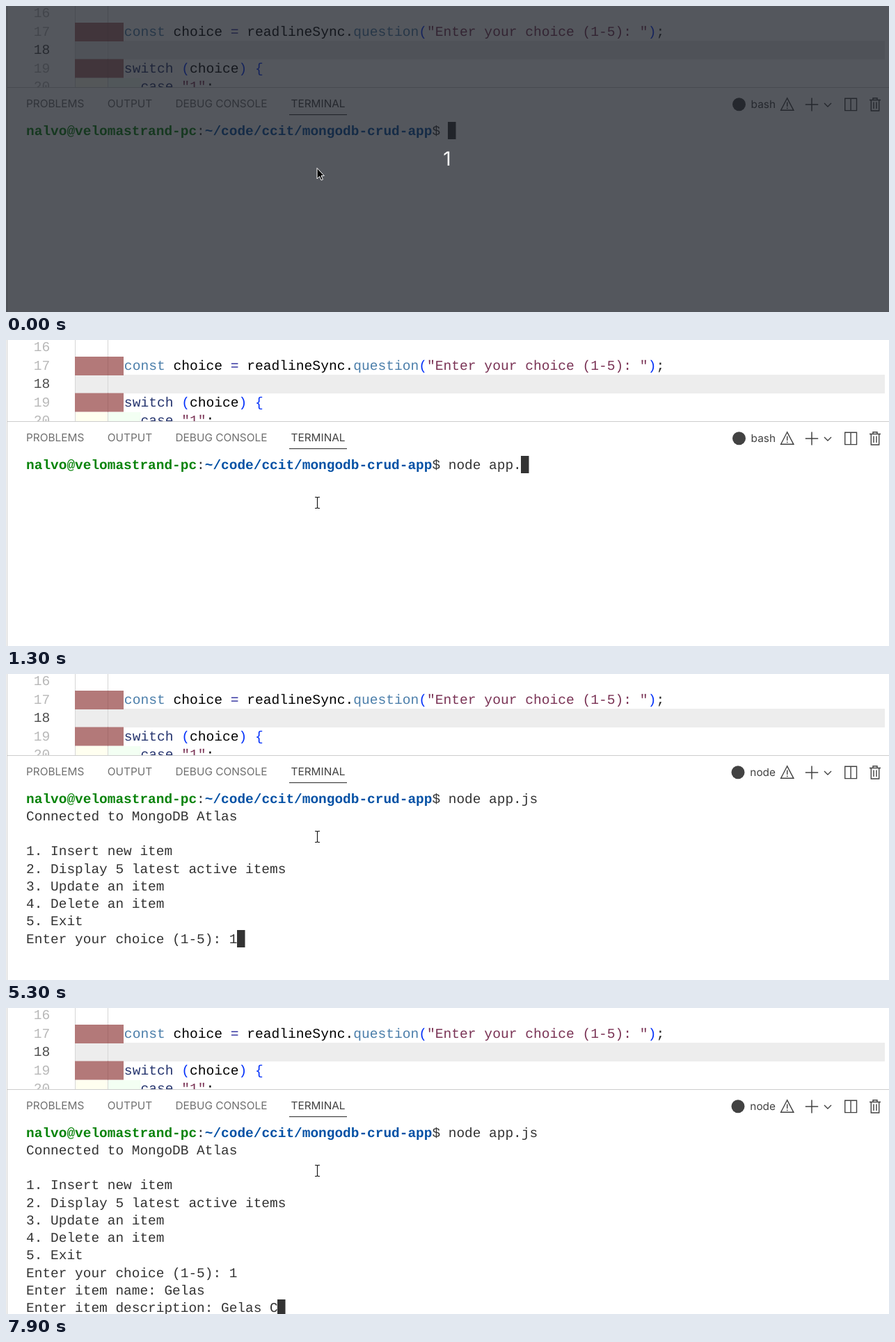
These frames come from a looping animation (1269x441 px, 8000 ms). An HTML page with a canvas:

```html
<!DOCTYPE html>
<html lang="en">
<head>
<meta charset="utf-8">
<title>Terminal session</title>
<style>
  html, body { margin: 0; width: 100%; height: 100%; overflow: hidden; background: #fff; }
  canvas { display: block; }
</style>
</head>
<body>
<canvas id="stage" width="1269" height="441"></canvas>
<script>
const W = 1269, H = 441, LOOP = 8000;
const ctx = document.getElementById('stage').getContext('2d');
ctx.textRendering = 'geometricPrecision';

const MONO = '"Liberation Mono", monospace';
const UI = '15.4px Inter, sans-serif';
const CODE = { x: 99.3, top: -2.2, row: 26.5, base: 18.6, size: 19.6, cell: 11.762, first: 16 };
const TERM = { x: 29.1, top: 167, row: 25.25, base: 18.7, size: 19.44, cell: 11.667 };
const INK = '#333333', ICON = '#424242';
const KEYWORD = '#26356f', STRING = '#7a3355', BRACKET = '#0431fa', FUNC = '#4b7eaa';

const MENU = [
  'Connected to MongoDB Atlas',
  '',
  '1. Insert new item',
  '2. Display 5 latest active items',
  '3. Update an item',
  '4. Delete an item',
  '5. Exit'
];

function rect(x, y, w, h, color) {
  ctx.fillStyle = color;
  ctx.fillRect(x, y, w, h);
}

function text(str, x, y, font, color, align = 'left') {
  ctx.font = font;
  ctx.fillStyle = color;
  ctx.textAlign = align;
  ctx.fillText(str, x, y);
}

function stroke(d, color = ICON, width = 1.4) {
  ctx.strokeStyle = color;
  ctx.lineWidth = width;
  ctx.stroke(new Path2D(d));
}

// Draws [text, color] parts on a character grid
function spans(grid, col, line, parts, weight = '') {
  const y = grid.top + line * grid.row + grid.base;
  for (const [str, color] of parts) {
    text(str, grid.x + col * grid.cell, y, `${weight} ${grid.size}px ${MONO}`, color);
    col += str.length;
  }
}

function editor() {
  ctx.save();
  ctx.beginPath();
  ctx.rect(0, 0, W, 117);
  ctx.clip();
  rect(99, 50, 1164, 27, '#ededed');
  rect(99, 104, 47, 13, '#fffff0');
  rect(146, 104, 47.5, 13, '#f3fff3');
  rect(99, 0, 1, 117, '#d6d6d6');
  rect(146, 0, 1, 117, '#d6d6d6');
  for (const y of [24, 76.5]) {
    rect(99, y, 70, 27, '#b37979');
    rect(146, y, 1, 27, '#a56c6c');
  }
  for (let i = 0; i < 5; i++) {
    const color = i === 2 ? '#4d4d4d' : '#b8b8b8';
    spans(CODE, -5.06, i, [[String(CODE.first + i), color]]);
  }
  spans(CODE, 6, 1, [
    ['const ', FUNC], ['choice ', '#000'], ['= ', '#2c2c9c'], ['readlineSync.', '#000'],
    ['question', FUNC], ['(', BRACKET], ['"Enter your choice (1-5): "', STRING],
    [')', BRACKET], [';', '#222']
  ]);
  spans(CODE, 6, 3, [
    ['switch ', KEYWORD], ['(', BRACKET], ['choice', '#000'], [') {', BRACKET]
  ]);
  spans(CODE, 8, 4, [['case ', KEYWORD], ['"1"', STRING], [':', '#000']]);
  ctx.restore();
}

function panelBar(t) {
  rect(1, 0, 1, H, '#cccccc');
  rect(2, 117, W - 2, 1, '#cccccc');
  const tabs = [['PROBLEMS', 29], ['OUTPUT', 145.8], ['DEBUG CONSOLE', 243.5], ['TERMINAL', 409.5]];
  for (const [name, x] of tabs) {
    text(name, x, 145.7, UI, name === 'TERMINAL' ? ICON : '#6f6f6f');
  }
  rect(407, 156, 83, 1.2, ICON);

  const node = t >= 2100;
  text(node ? 'node' : 'bash', 1106, 147, UI, ICON, 'right');
  ctx.beginPath();
  ctx.arc(node ? 1052 : 1053.5, 141.7, 9.5, 0, 7);
  ctx.fillStyle = ICON;
  ctx.fill();

  stroke('M1122.7 132.8L1131.9 150.3H1113.6Z M1122.7 138.5V145 M1122.7 146.6V148.3');
  stroke('M1158 132.5V151.5 M1148.8 142H1167.2', ICON, 1.5);
  stroke('M1176 140L1181 145L1186 140');
  stroke('M1205.7 133.2H1222.5V150.6H1205.7Z M1214.1 133V151');
  stroke('M1241 135.5H1257 M1246 135V132.7H1252V135 M1243.3 136V151H1254.7V136 ' +
         'M1247 138.5V148 M1251 138.5V148');
}

// One character per 100 ms from each start time
function typed(t, runs) {
  return runs.map(([start, str]) =>
    str.slice(0, Math.max(0, Math.floor((t - start) / 100) + 1))).join('');
}

function terminal(t) {
  const user = 'nalvo@velomastrand-pc', path = '~/code/ccit/mongodb-crud-app';
  spans(TERM, 0, 0, [[user, '#08830a']], 'bold');
  spans(TERM, user.length, 0, [[':', INK]]);
  spans(TERM, user.length + 1, 0, [[path, '#0451a5']], 'bold');

  const col = user.length + path.length + 1;
  const command = '$ ' + typed(t, [[500, 'node app.'], [1600, 'js']]);
  spans(TERM, col, 0, [[command, INK]]);
  let cx = col + command.length, cy = 0;
  const print = (str, line) => {
    spans(TERM, 0, line, [[str, INK]]);
    cx = str.length;
    cy = line;
  };

  if (t >= 2000) print('', 1);
  if (t >= 4000) {
    MENU.forEach((str, i) => print(str, i + 1));
    print('Enter your choice (1-5): ' + typed(t, [[5300, '1']]), 8);
  }
  if (t >= 5500) print('Enter item name: ' + typed(t, [[6200, 'Gel'], [6600, 'as']]), 9);
  if (t >= 6900) {
    const runs = [[7200, 'Ge'], [7500, 'las'], [7700, ' '], [7900, 'C']];
    print('Enter item description: ' + typed(t, runs), 10);
  }
  const x = Math.round(TERM.x + cx * TERM.cell - 0.3);
  rect(x, Math.round(TERM.top + cy * TERM.row), 11.5, 25, INK);
}

function beam() {
  const d = 'M444 226.5H446.5L447.5 227.5L448.5 226.5H451 M447.5 227V242 ' +
            'M444 242.5H446.5L447.5 241.5L448.5 242.5H451';
  stroke(d, '#ffffff', 3);
  stroke(d, '#1a1a1a', 1.2);
}

function countdown() {
  rect(0, 0, W, H, 'rgba(27, 31, 39, 0.75)');
  text('1', 634, 229.5, '28px Inter, sans-serif', '#fff', 'center');
  const arrow = new Path2D('M447 233.5V249L450.6 245.6L453 251L455.4 250L453 244.7H457.3Z');
  ctx.fillStyle = '#000';
  ctx.fill(arrow);
  ctx.strokeStyle = '#fff';
  ctx.lineWidth = 1;
  ctx.stroke(arrow);
}

function draw() {
  const t = performance.now() % LOOP;
  rect(0, 0, W, H, '#fff');
  editor();
  panelBar(t);
  terminal(t);
  if (t < 100) countdown();
  else beam();
  requestAnimationFrame(draw);
}
draw();
</script>
</body>
</html>
```
